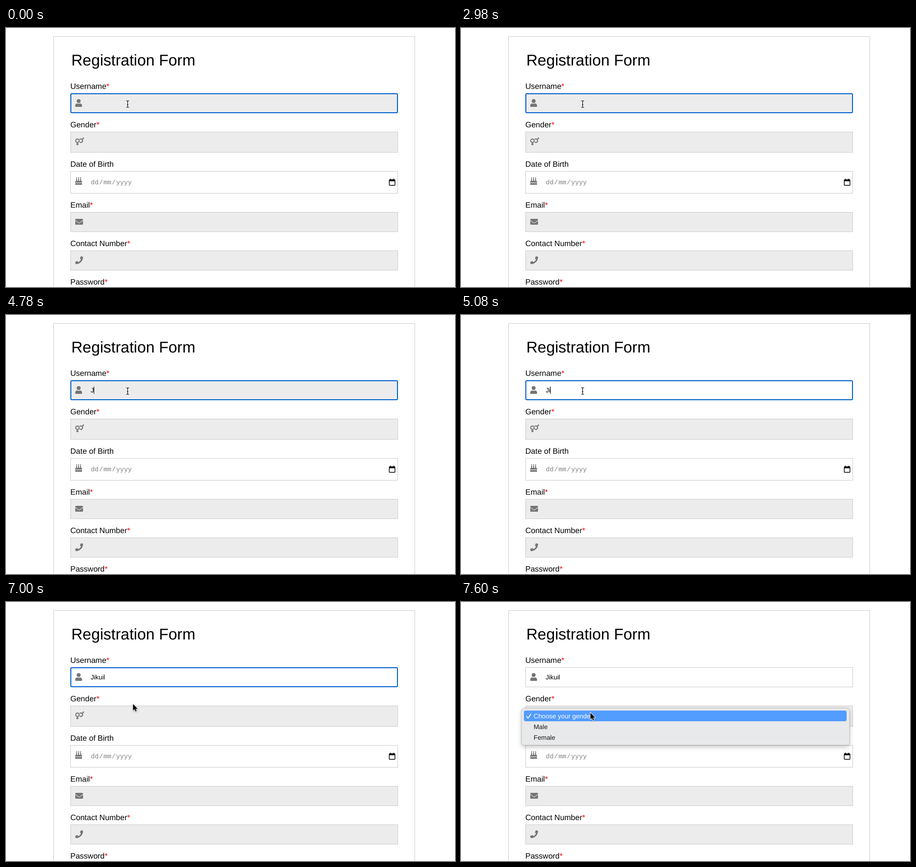
These frames come from a looping animation (921x532 px, 8 s). An HTML page:

```html
<!DOCTYPE html>
<html lang="en">
<head>
<meta charset="utf-8">
<title>Registration form</title>
<style>
html, body { margin: 0; width: 100%; height: 100%; overflow: hidden; background: #fff; }
svg { display: block; width: 921px; height: 532px; }
text { font: 16px Arial, "Liberation Sans", sans-serif; text-rendering: geometricPrecision; white-space: pre; }
.title { font-size: 32px; }
.small { font-size: 13.333px; }
.date { font: 13.333px "Courier New", "Liberation Mono", monospace; fill: #808080; }
.star { fill: #f00; }
.field { fill: #ececec; stroke: #ccc; }
.plain { fill: #fff; }
.icon { fill: #757575; }
.line { fill: none; stroke: #757575; stroke-width: 2; }

.user, .ring, .typed, .blink, .caret, .beam, .arrow, .menu {
  animation: 8s step-end infinite;
}
.user { animation-name: fill; }
.ring { animation-name: blur; }
.typed { animation-name: type; }
.blink { animation-name: blink; }
.caret { animation-name: advance; }
.beam { animation-name: leave; }
.arrow { animation-name: point; }
.menu { animation-name: open; }

@keyframes fill { 0% { fill: #ececec; } 63.5%, 100% { fill: #fff; } }
@keyframes blur { 0% { opacity: 1; } 93.125%, 100% { opacity: 0; } }
@keyframes open { 0% { opacity: 0; } 95%, 100% { opacity: 1; } }
@keyframes leave { 0% { opacity: 1; } 85.625%, 100% { opacity: 0; } }
@keyframes type {
  0% { width: 0px; }
  59.75% { width: 7.5px; }
  63.5% { width: 10.5px; }
  65.375% { width: 17.1px; }
  67.125% { width: 24.5px; }
  74.5% { width: 27.5px; }
  76.375%, 100% { width: 40px; }
}
@keyframes advance {
  0% { transform: translateX(0); }
  59.75% { transform: translateX(7px); }
  63.5% { transform: translateX(10px); }
  65.375% { transform: translateX(17px); }
  67.125% { transform: translateX(24px); }
  74.5% { transform: translateX(27px); }
  76.375%, 100% { transform: translateX(30px); }
}
@keyframes blink {
  0%, 11.25%, 24.25%, 37.25%, 48.5%, 72.75%, 83.875%, 93.125%, 100% { opacity: 0; }
  5.625%, 18.75%, 29.875%, 42.875%, 56%, 74.5%, 89.375% { opacity: 1; }
}
@keyframes point {
  0% { opacity: 0; transform: translate(248.5px, 185px); }
  85.625% { opacity: 1; transform: translate(248.5px, 185px); }
  87.5% { opacity: 1; transform: translate(260.5px, 209.5px); }
  89.375% { opacity: 1; transform: translate(263.5px, 215.5px); }
  91.25%, 100% { opacity: 1; transform: translate(265.5px, 227.5px); }
}
</style>
</head>
<body>
<svg viewBox="0 0 921 532">
  <defs>
    <clipPath id="shown"><rect class="typed" x="173" y="140" width="0" height="30"/></clipPath>
    <filter id="soft" x="-10%" y="-40%" width="120%" height="190%">
      <feDropShadow dx="0" dy="4" stdDeviation="5" flood-opacity=".22"/>
    </filter>
    <filter id="tiny" x="-40%" y="-40%" width="200%" height="200%">
      <feDropShadow dx=".3" dy="1" stdDeviation=".8" flood-opacity=".35"/>
    </filter>
  </defs>

  <rect x="97.5" y="17.5" width="741" height="600" fill="#fff" stroke="#ccc"/>
  <text class="title" x="134" y="77">Registration Form</text>

  <text x="132" y="125">Username<tspan class="star">*</tspan></text>
  <text x="132" y="204">Gender<tspan class="star">*</tspan></text>
  <text x="132" y="285">Date of Birth</text>
  <text x="132" y="369">Email<tspan class="star">*</tspan></text>
  <text x="132" y="448">Contact Number<tspan class="star">*</tspan></text>
  <text x="132" y="527">Password<tspan class="star">*</tspan></text>

  <rect class="field user" x="132.5" y="134.5" width="671" height="40"/>
  <rect class="field" x="132.5" y="213.5" width="671" height="42"/>
  <rect class="field plain" x="132.5" y="294.5" width="671" height="45"/>
  <rect class="field" x="132.5" y="378.5" width="671" height="40"/>
  <rect class="field" x="132.5" y="457.5" width="671" height="40"/>
  <g class="ring">
    <path d="M132 134h672v41h-672z" fill="none" stroke="#fff"/>
    <rect x="133" y="135" width="670" height="39" rx="2" fill="none" stroke="#005fcc" stroke-width="2"/>
  </g>

  <!-- field icons -->
  <g class="icon" transform="translate(142 146)">
    <circle cx="7" cy="4" r="4"/>
    <path d="M4.2 9Q7 10 9.8 9A4.2 4.2 0 0 1 14 13.2V14.5A1.5 1.5 0 0 1 12.5 16H1.5A1.5 1.5 0 0 1 0 14.5V13.2A4.2 4.2 0 0 1 4.2 9z"/>
  </g>
  <g transform="translate(142 225)">
    <circle class="line" cx="4.5" cy="6.5" r="3.5"/>
    <path class="line" d="M4.5 10V16M2 13.5H7M9.2 3.9A3.5 3.5 0 1 1 9.2 9.1M14 4L16.6 1.4"/>
    <path class="icon" d="M14.8 0H18V3.2z"/>
  </g>
  <g class="icon" transform="translate(142 306)">
    <path d="M2 3.5h2V8h2V3.5h2V8h2V3.5h2V8h.5A1.5 1.5 0 0 1 14 9.5V12C13 12 12.8 11 11.7 11S10.2 12 9.3 12 8.2 11 7 11 5.6 12 4.7 12 3.6 11 2.3 11 1 12 0 12V9.5A1.5 1.5 0 0 1 1.5 8H2z"/>
    <path d="M0 13C1.4 13 1.5 12 2.3 12S3.4 13 4.7 13 6.1 12 7 12 8 13 9.3 13 10.8 12 11.7 12 12.6 13 14 13V16H0z"/>
    <path id="flame" d="M3 3A1 1 0 0 1 2 2C2 1 3 1.3 3 0 3.4 0 4 .9 4 1.8S3.6 3 3 3z"/>
    <use href="#flame" x="4"/><use href="#flame" x="8"/>
  </g>
  <g class="icon" transform="translate(142 390)">
    <path d="M0 6.2Q0 5.8.3 6L5.1 9.5C5.8 10 6.9 11 8 11S10.2 10 10.9 9.5L15.7 6Q16 5.8 16 6.2V12.5A1.5 1.5 0 0 1 14.5 14H1.5A1.5 1.5 0 0 1 0 12.5z"/>
    <path d="M8 10C7.3 10 6.2 9.1 5.7 8.7L.3 4.7Q0 4.4 0 4.1V3.5A1.5 1.5 0 0 1 1.5 2H14.5A1.5 1.5 0 0 1 16 3.5V4.1Q16 4.4 15.7 4.7L10.3 8.7C9.8 9.1 8.7 10 8 10z"/>
  </g>
  <path class="icon" transform="translate(142 469)" d="M15.4.8L12.2 0Q11.5 0 11.3.5L9.8 4Q9.6 4.5 10 4.8L11.9 6.4A11.5 11.5 0 0 1 6.4 11.9L4.8 10Q4.5 9.6 4 9.8L.5 11.3Q0 11.5 0 12.2L.8 15.4Q.9 16 1.5 16A14.5 14.5 0 0 0 16 1.5Q16 .9 15.4.8z"/>

  <!-- date field -->
  <text class="date" y="321"><tspan x="174">dd</tspan><tspan x="191">/</tspan><tspan x="200">mm</tspan><tspan x="217">/</tspan><tspan x="226">yyyy</tspan></text>
  <rect x="786.2" y="311.7" width="11.6" height="11.6" rx="1" fill="none" stroke="#000" stroke-width="1.4"/>
  <path d="M786 311.5h12v3.2h-12zM787.8 309.5h1.6v2h-1.6zM794.6 309.5h1.6v2h-1.6z"/>

  <!-- typed name -->
  <g clip-path="url(#shown)"><text class="small" x="173.7" y="159">Jikuil</text></g>
  <g class="blink"><rect class="caret" x="173" y="147" width="1" height="15"/></g>

  <!-- open list -->
  <g class="menu">
    <rect x="124" y="218" width="673" height="76" rx="6" fill="#e8e9eb" filter="url(#soft)"/>
    <rect x="123.9" y="217.9" width="673.2" height="76.2" rx="6" fill="none" stroke="#b4b4b6" stroke-width=".8"/>
    <rect x="129" y="223" width="662" height="22" rx="4" fill="#529bff"/>
    <path d="M134.5 235L137.5 238.6L143.3 230.2" fill="none" stroke="#fff" stroke-width="1.7" stroke-linecap="round" stroke-linejoin="round"/>
    <text class="small" x="149" y="239" fill="#fff">Choose your gender</text>
    <text class="small" x="149" y="261" fill="#1a1a1a">Male</text>
    <text class="small" x="149" y="283" fill="#1a1a1a">Female</text>
  </g>

  <!-- pointers -->
  <g class="beam" fill="none">
    <path d="M246.5 149.5H248.5L249.5 150.5L250.5 149.5H252.5M249.5 150.5V162M246.5 163H248.5L249.5 162L250.5 163H252.5M248 157.5H251" stroke="#fff" stroke-width="2.4" opacity=".7"/>
    <path d="M246.5 149.5H248.5L249.5 150.5L250.5 149.5H252.5M249.5 150.5V162M246.5 163H248.5L249.5 162L250.5 163H252.5M248 157.5H251" stroke="#000" stroke-width="1.1"/>
  </g>
  <g class="arrow">
    <path d="M0 0V13.6L3.1 10.8L5.1 15.6L7.4 14.6L5.4 9.9H9.7z" stroke="#fff" stroke-width="1.8" paint-order="stroke" filter="url(#tiny)"/>
  </g>
</svg>
</body>
</html>
```
